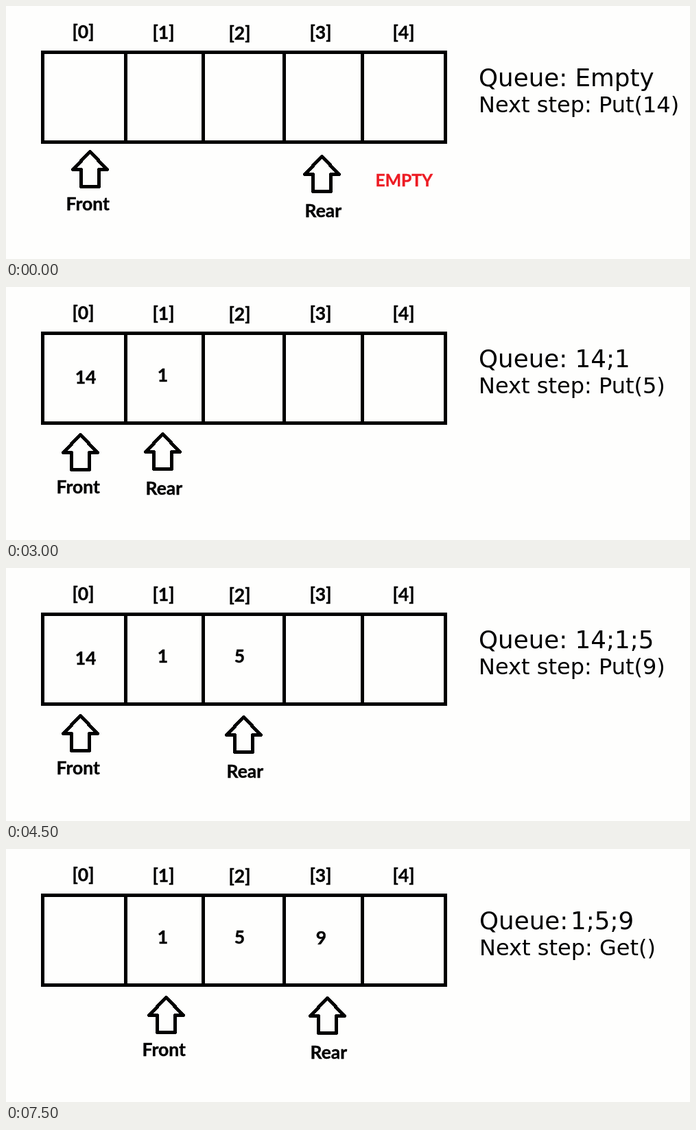
An HTML page for the animation above (8 s loop, 997 by 369 pixels).

```html
<!DOCTYPE html>
<html lang="en">
<head>
<meta charset="utf-8">
<title>Circular queue</title>
<style>
  html, body { margin: 0; width: 100%; height: 100%; overflow: hidden; background: #fefefd; }
  svg { display: block; width: 997px; height: 369px; }
  .bold { font: 700 26.5px Lato, sans-serif; stroke: #000; stroke-width: .4; }
  .mid { text-anchor: middle; }
  .red { font-size: 24.7px; fill: #ed1c24; stroke: #ed1c24; }
  .queue { font: 35.7px "DejaVu Sans", sans-serif; }
  .next { font: 32px "DejaVu Sans", sans-serif; }
  .line { fill: none; stroke: #000; stroke-width: 5; shape-rendering: crispEdges; }
  .arrow { stroke-linejoin: round; }
</style>
</head>
<body>
<svg id="stage" viewBox="0 0 997 369"></svg>
<script>
const STEP = 1500, LOOP = 8000;

// front and rear: [arrow centre x, arrow foot y, label left x, label baseline y]
const steps = [
  { front: [122, 264, 89, 298], rear: [460, 271, 437, 308], cells: [], queue: "Empty", next: "Put(14)", note: ["EMPTY", 540] },
  { front: [74, 266, 41, 300], rear: [154, 264, 131, 301], cells: [0], queue: "14", next: "Put(1)" },
  { front: [108, 267, 75, 301], rear: [228, 266, 205, 303], cells: [0, 1], queue: "14;1", next: "Put(5)" },
  { front: [108, 267, 75, 301], rear: [346, 269, 323, 306], cells: [0, 1, 2], queue: "14;1;5", next: "Put(9)" },
  { front: [108, 267, 75, 301], rear: [468, 269, 445, 306], cells: [0, 1, 2, 3], queue: "14;1;5;9", next: "Get()", note: ["FULL", 546] },
  { front: [233, 268, 200, 302], rear: [468, 269, 445, 306], cells: [1, 2, 3], queue: "1;5;9", next: "Get()", textX: 690, queueX: 823 }
];

const indexX = [112.5, 229.5, 340.5, 458.5, 579.5];
const indexY = [47, 48, 49, 48, 48];
const values = [["14", 116, 141], ["1", 228.5, 138], ["5", 340.5, 138], ["9", 459.5, 139]];

const text = (label, x, y, style) => `<text class="${style}" x="${x}" y="${y}">${label}</text>`;

const pointer = (label, [x, foot, labelX, baseline]) =>
  `<path class="line arrow" d="M${x + .5} ${foot - 51.5}l25 26h-12v25h-26v-25h-12z"/>` +
  text(label, labelX - 1.5, baseline, "bold");

const frame =
  '<path class="line" d="M53.5 67.5H640.5V198.5H53.5Z"/>' +
  '<path class="line" d="M174.5 67V199M287.5 67V199M405.5 67V199M519.5 67V199"/>' +
  indexX.map((x, i) => text(`[${i}]`, x, indexY[i], "bold mid")).join("");

function render({ front, rear, cells, queue, next, note, textX = 689, queueX = 829.5 }) {
  return frame +
    cells.map(i => text(...values[i], "bold mid")).join("") +
    pointer("Front", front) +
    pointer("Rear", rear) +
    (note ? text(note[0], note[1] - 1.5, 263, "bold red") : "") +
    text("Queue:", textX, 117, "queue") +
    text(queue, queueX, 117, "queue") +
    text("Next step: " + next, textX, 155, "next");
}

const stage = document.getElementById("stage");
const start = performance.now();
let shown = -1;

function tick() {
  const current = Math.floor((performance.now() - start) % LOOP / STEP);
  if (current !== shown) {
    stage.innerHTML = render(steps[current]);
    shown = current;
  }
  requestAnimationFrame(tick);
}
tick();
</script>
</body>
</html>
```
